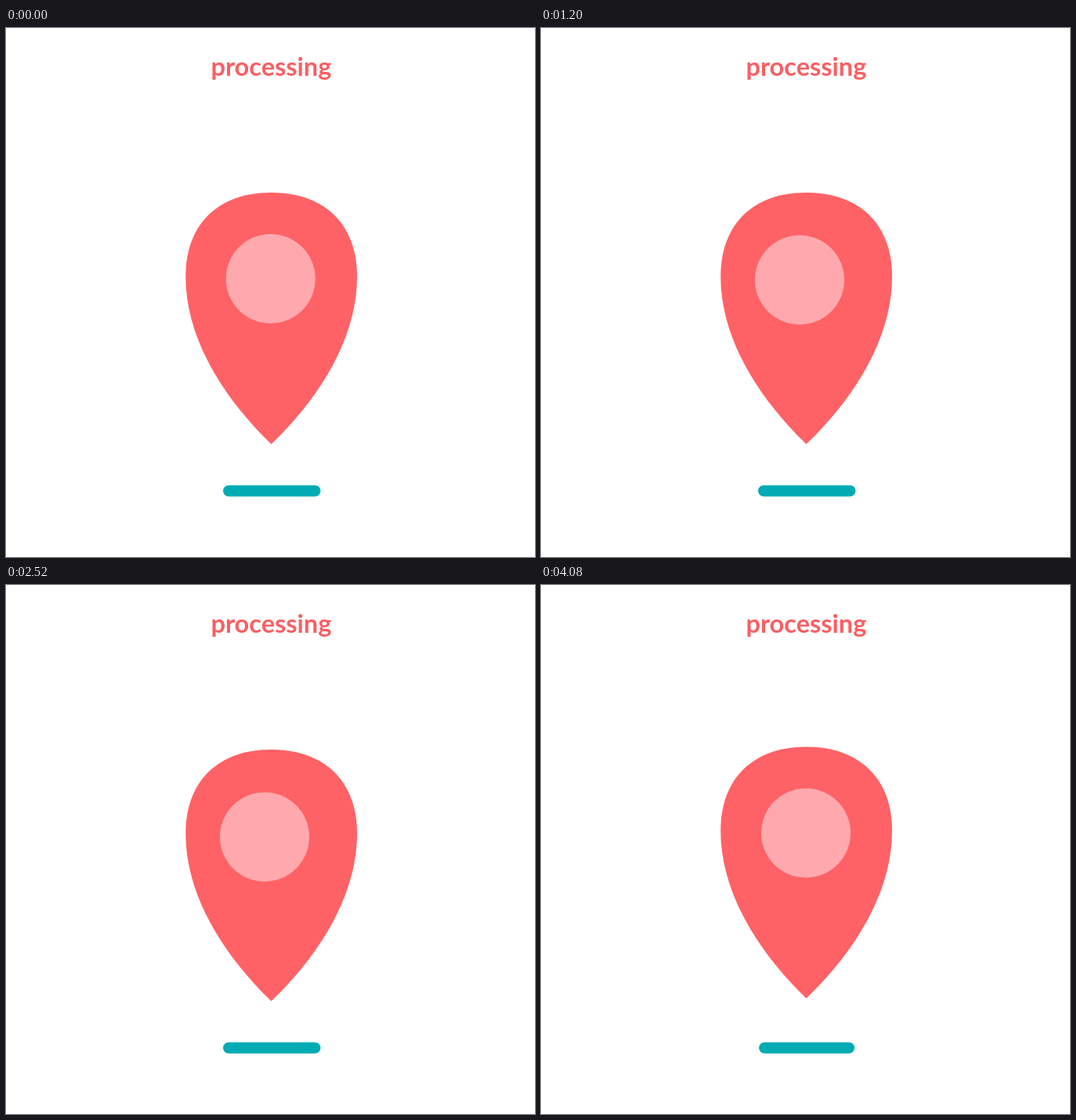
These frames come from a looping animation (675 by 675 pixels, 4.11 s). An HTML page:

```html
<!DOCTYPE html>
<html lang="en">
<head>
<meta charset="utf-8">
<title>processing</title>
<style>
  html, body { margin: 0; width: 100%; height: 100%; overflow: hidden; background: #fff; }
  svg { display: block; width: 100vw; height: 100vh; }
  text { font: 700 32.5px Lato, sans-serif; text-anchor: middle; fill: #f95f63; }
</style>
</head>
<body>
<svg viewBox="0 0 675 675">
  <text x="338.4" y="60.7">processing</text>
  <rect id="bar" y="583.5" height="14.3" rx="7.15" fill="#01abb3"/>
  <g id="pin">
    <path fill="#ff6266" d="M338.5 210 C406 210 448 250 448 317 C448 394 402 470 338.5 531 C275 470 229.2 394 229.2 317 C229.2 250 271 210 338.5 210Z"/>
    <circle id="eye" cx="338" cy="320" r="57" fill="#ffa9ae"/>
  </g>
</svg>
<script>
  const LOOP = 4110, STEP = 30, CYCLE = 1320;
  const [bar, pin, eye] = ['bar', 'pin', 'eye'].map(id => document.getElementById(id));

  // Eased value through [time, value] keys
  function track(keys, t) {
    const i = keys.findIndex(k => k[0] > t);
    if (i < 0) return keys[keys.length - 1][1];
    if (i === 0) return keys[0][1];
    const [t0, a] = keys[i - 1], [t1, b] = keys[i];
    const u = (t - t0) / (t1 - t0);
    return a + (b - a) * u * u * (3 - 2 * u);
  }

  const LIFT = [[0, 0], [610, 1], [1200, 0]];
  const GLANCE = [[510, 0], [770, 13.7], [1060, -13.7], [1320, 0]];
  const EYE_DELAY = 25;

  function draw(t) {
    const lift = track(LIFT, t % CYCLE);
    const look = track(GLANCE, (t - EYE_DELAY + CYCLE) % CYCLE);
    pin.setAttribute('transform', `translate(0 ${-34.7 * lift})`);
    eye.setAttribute('cx', 338 + look);
    eye.setAttribute('cy', 319.9 + 0.023 * look * look);
    bar.setAttribute('x', 277 + 11.5 * lift);
    bar.setAttribute('width', 124.4 - 25 * lift);
  }

  const start = performance.now();
  function tick() {
    const t = (performance.now() - start) % LOOP;
    draw(Math.floor(t / STEP) * STEP);
    requestAnimationFrame(tick);
  }
  tick();
</script>
</body>
</html>
```
